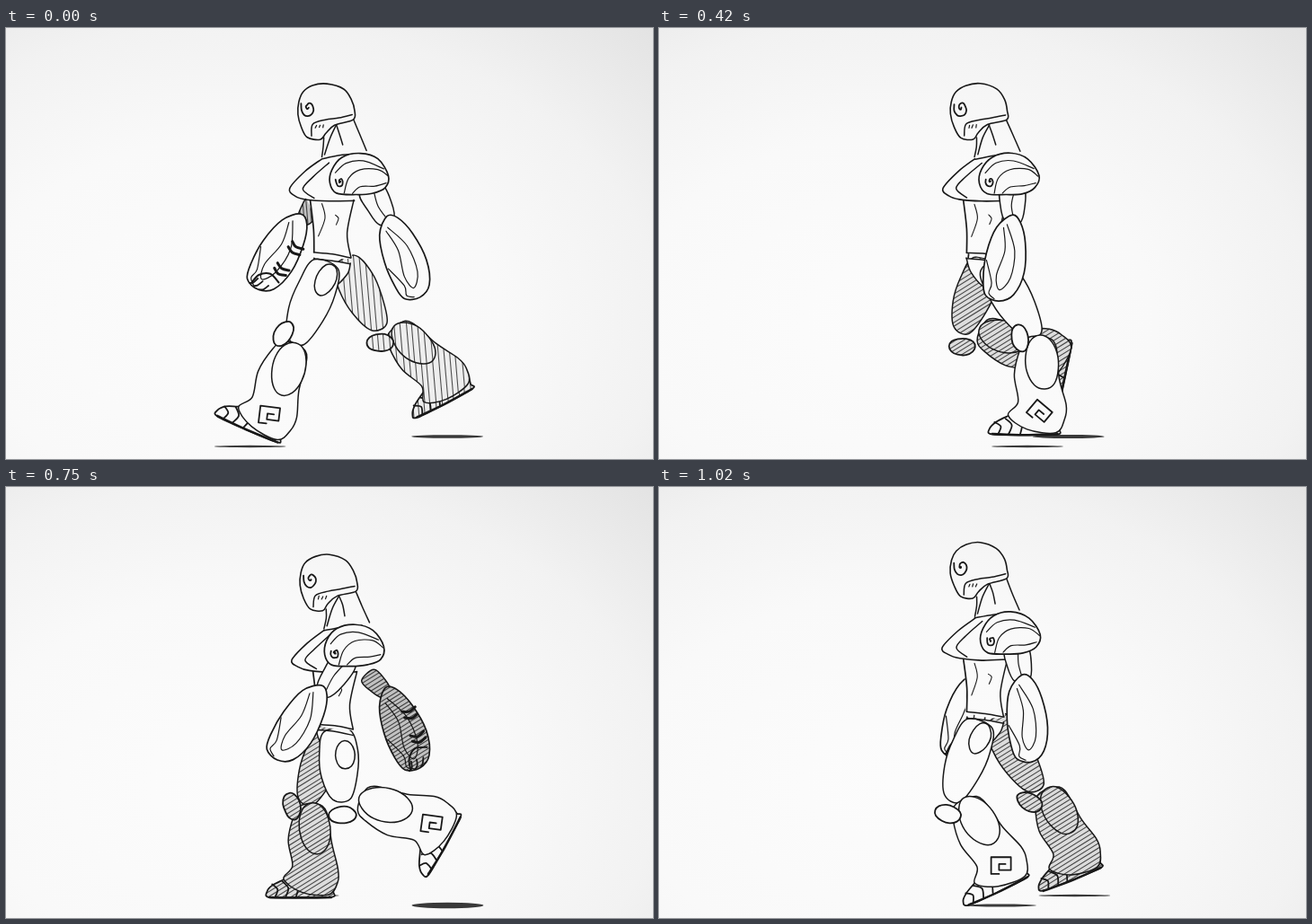
Write an HTML page with a canvas that moves like this. It is 720x480 px and loops after 1.05 s.

```html
<!DOCTYPE html>
<html lang="en">
<head>
<meta charset="utf-8">
<title>Walk cycle</title>
<style>
  html, body { margin: 0; width: 100%; height: 100%; overflow: hidden; }
  body { background: radial-gradient(ellipse at 36% 68%, #fcfcfc 0, #f9f9f9 45%, #f2f2f2 72%, #e3e3e3 100%); }
  canvas { display: block; width: 720px; height: 480px; }
</style>
</head>
<body>
<canvas id="stage" width="720" height="480"></canvas>
<script>
const ctx = document.getElementById('stage').getContext('2d');
const LOOP = 1050, STEP = 30, CYCLE = 37, INK = '#181818';
const TAU = Math.PI * 2, RAD = Math.PI / 180;
const wave = p => Math.cos(TAU * p);

// One stride, shared by both legs: phase, thigh, shin and sole angles in degrees.
const STRIDE = [
  [0, 21, 20, -24],
  [.1, 26, 12, -2],
  [.14, 27, -1, 0],
  [.25, 4, -2, 0],
  [.38, -32, 0, 0],
  [.42, -31, -24, 22],
  [.5, -29, -43, 27],
  [.59, -25, -33, 8],
  [.64, -7, -72, 58],
  [.75, -1, -67, 65],
  [.88, 18, -70, 78],
  [.92, 20, -28, 24],
  [1, 21, 20, -24]
];

function stride(phase) {
  const i = STRIDE.findIndex(row => row[0] > phase);
  const a = STRIDE[i - 1], b = STRIDE[i], s = (phase - a[0]) / (b[0] - a[0]);
  return a.slice(1).map((v, k) => (v + (b[k + 1] - v) * s) * RAD);
}

// Positive angles swing forward, to the left.
const swing = ([x, y], len, angle) => [x - len * Math.sin(angle), y + len * Math.cos(angle)];
const shift = ([x, y], [dx, dy], k = 1) => [x + dx * k, y + dy * k];

let seed = 1;
function rnd() {
  seed = (seed * 16807) % 2147483647;
  return seed / 2147483647;
}

const pairs = a => a.reduce((out, v, i) => (i % 2 ? out[out.length - 1].push(v) : out.push([v]), out), []);

// Curve through points, with a slight hand wobble.
function curve(points, closed) {
  const p = points.map(([x, y]) => [x + rnd() - .5, y + rnd() - .5]);
  const n = p.length;
  const at = i => closed ? p[(i + n) % n] : p[Math.max(0, Math.min(n - 1, i))];
  const path = new Path2D();
  path.moveTo(...p[0]);
  for (let i = 0; i < (closed ? n : n - 1); i++) {
    const [a, b, c, d] = [at(i - 1), at(i), at(i + 1), at(i + 2)];
    path.bezierCurveTo(b[0] + (c[0] - a[0]) / 6, b[1] + (c[1] - a[1]) / 6,
      c[0] - (d[0] - b[0]) / 6, c[1] - (d[1] - b[1]) / 6, c[0], c[1]);
  }
  return path;
}

function stroke(path, width = 1.5) {
  ctx.lineWidth = width;
  ctx.stroke(path);
}

function erase(path) {
  ctx.globalCompositeOperation = 'destination-out';
  ctx.fill(path);
  ctx.globalCompositeOperation = 'source-over';
}

function hatch(path, { angle, gap, tint }) {
  ctx.save();
  ctx.clip(path);
  ctx.globalAlpha = tint;
  ctx.fill(path);
  ctx.globalAlpha = .75;
  ctx.translate(360, 320);
  ctx.rotate(angle * RAD);
  ctx.lineWidth = 1.1;
  ctx.beginPath();
  for (let y = -260; y < 260; y += gap) {
    ctx.moveTo(-260, y);
    ctx.lineTo(260, y + rnd() * 2);
  }
  ctx.stroke();
  ctx.restore();
}

// A limb runs from a to b; shapes are in percent along it and across its width.
const limb = (a, b, w) => ({ a, b, w });
function along({ a, b, w }, list) {
  const dx = b[0] - a[0], dy = b[1] - a[1], len = Math.hypot(dx, dy) || 1;
  return pairs(list).map(([u, v]) =>
    [a[0] + (dx * u - dy / len * w * v) / 100, a[1] + (dy * u + dx / len * w * v) / 100]);
}

const oval = [];
for (let i = 0; i < 10; i++) oval.push(50 - 50 * wave(i / 10), 50 * Math.sin(i * TAU / 10));

const shapes = {
  oval,
  thigh: [0,32, 30,48, 65,47, 98,24, 100,-20, 65,-44, 30,-50, 0,-32],
  shin: [3,20, 15,35, 45,48, 76,40, 92,60, 108,22, 112,-36, 96,-55, 80,-57, 50,-44, 12,-36, 2,-15],
  foot: [-1,75, -2,25, 0,0, 50,-3, 97,0, 101,25, 92,55, 76,80, 60,100, 40,105],
  arm: [0,45, 50,48, 95,30, 100,-25, 55,-46, 0,-40],
  fore: [0,8, 18,38, 50,48, 80,42, 97,28, 101,-8, 90,-40, 62,-52, 28,-40, 6,-18],
  shoulder: [0,12, 4,-20, 22,-48, 52,-57, 82,-42, 100,-4, 94,25, 72,38, 45,40, 12,36]
};

function part(row, shape, ink, width) {
  const path = curve(along(row, shapes[shape]), true);
  erase(path);
  if (ink) hatch(path, ink);
  stroke(path, width);
}

const detail = (row, list, width = 1.2) => stroke(curve(along(row, list)), width);

function spiral(x, y, r, turns) {
  const p = [];
  for (let s = 0; s <= 1; s += 1 / 14) {
    const a = s * turns * TAU + 1;
    p.push([x + r * .75 * s * Math.cos(a), y + r * s * Math.sin(a)]);
  }
  stroke(curve(p), 1.8);
}

// Joints of one leg, from hip to sole.
function poseLeg(phase, hip, size) {
  const [thighTurn, shinTurn, tilt] = stride(phase);
  const lift = Math.max(0, -wave(phase - .2));
  const top = shift(hip, [-8 * wave(phase), 0]);
  const knee = swing(top, 93 * size * (1 - .17 * lift), thighTurn);
  const shinTop = shift(knee, [3 - 16 * Math.sin(shinTurn), 0]);
  const ankle = swing(shinTop, 97 * size, shinTurn);
  const ahead = [-Math.cos(tilt), Math.sin(tilt)], up = [-ahead[1], ahead[0]];
  const heel = shift(shift(ankle, ahead, -22), up, -13);
  const foot = limb(heel, shift(heel, ahead, 75 * size), 24);
  const capTurn = Math.max(-90 * RAD, 2.2 * shinTurn - 10 * RAD);
  const out = [-Math.cos(capTurn), -Math.sin(capTurn)], edge = [-out[1], out[0]];
  const cap = shift(knee, out, 17);
  const shin = limb(shinTop, ankle, 55 * size);
  return {
    lift, shinTurn, shin, foot,
    thigh: limb(top, knee, 44 * size),
    calf: limb(...along(shin, [0, -4, 62, -14]), 37 * size),
    cap: limb(shift(cap, edge, 15), shift(cap, edge, -15), 19)
  };
}

function drawShadow({ foot: { a, b }, lift }, ground) {
  ctx.globalAlpha = .85;
  ctx.beginPath();
  ctx.ellipse((a[0] + b[0]) / 2 + 4, ground, 40, 1.2 + 2 * lift, 0, 0, TAU);
  ctx.fill();
  ctx.globalAlpha = 1;
}

function drawLeg(leg, ink) {
  const { foot } = leg;
  part(leg.thigh, 'thigh', ink);
  part(foot, 'foot', ink, 1.8);
  detail(foot, [0,0, 50,-3, 97,0], 2.4);
  for (const u of [93, 77, 61]) detail(foot, [u, 150 - u, u - 9, 80 - u / 2, u - 5, 0], 1.8);
  part(leg.shin, 'shin', ink);
  part(leg.calf, 'oval', ink);
  part(leg.cap, 'oval', ink, 1.8);
}

function drawEmblem({ shin, shinTurn }) {
  const [[x, y]] = along(shin, [88, -4]);
  ctx.save();
  ctx.translate(x, y);
  ctx.rotate(40 * RAD * Math.max(0, Math.cos(4 * shinTurn)));
  ctx.lineWidth = 1.8;
  ctx.beginPath();
  pairs([-.2,.9, -1,.9, -1,-.8, 1,-.8, 1,.5, -.2,.5, -.2,-.1, .45,-.1]).forEach(([u, v]) => ctx.lineTo(u * 11, v * 11));
  ctx.stroke();
  ctx.restore();
}

// The forearm trails the elbow and lingers near the middle of its swing.
function poseArm(phase, rootX, rootY, rootSwing, elbowX, elbowSwing, width) {
  const reach = wave(phase - .13), c = wave(phase - .09);
  const elbow = [elbowX + elbowSwing * reach, 209];
  const tip = swing(elbow, 96, (8 - 18 * (c + c ** 3)) * RAD);
  return {
    reach,
    upper: limb([rootX + rootSwing * reach, rootY], shift(elbow, [-2, 8]), width),
    fore: limb(elbow, tip, 45)
  };
}

function drawForearm(fore, ink) {
  part(fore, 'fore', ink, 1.7);
  detail(fore, [12,14, 40,-18, 72,-22, 88,-2, 72,12, 42,6, 16,20]);
  detail(fore, [58,45, 82,20, 94,22, 99,5]);
}

function drawFarArm({ upper, fore, reach }, ink) {
  part(upper, 'arm', ink);
  drawForearm(fore, reach > 0 && ink);
  for (const u of [32, 40, 62, 69]) detail(fore, [u, -46, u + 3, -28, u, -12], 3);
  detail(fore, [80,-42, 78,-12, 86,10, 99,14], 2);
  for (const v of [-24, -8, 6]) detail(fore, [90, v, 97, v + 5, 100, v + 12], 1.8);
}

function drawTorso() {
  const [neck, tip, low, under, waistF, hipF, waistB, hipB] =
    pairs([350,146, 314,179, 333,191, 386,192, 341,224, 341,250, 378,229, 382,256]);
  const top = shift(neck, [42, -6]);
  erase(curve([neck, tip, low, waistF, hipF, hipB, waistB, under, top], true));
  stroke(curve([neck, [331, 160], tip, [321, 187], low, [358, 193], under]), 1.6);
  stroke(curve([[358, 150], [340, 166], [329, 179], [341, 189]]));
  stroke(curve([neck, [370, 142], top]));
  stroke(curve([[337, 192], waistF, hipF]), 1.7);
  stroke(curve([under, waistB, hipB]));
  for (const dy of [0, 7]) stroke(curve([hipF, [362, 252], hipB].map(p => shift(p, [0, dy]))));
  stroke(curve([[365, 208], [369, 212], [366, 219]]), 1.1);
  stroke(curve([[350, 196], [353, 212], [346, 232]]), 1.1);
}

function drawPelvis() {
  const path = curve(pairs([341,256, 346,272, 362,288, 378,274, 382,262]));
  erase(path);
  stroke(path);
}

function drawHead() {
  const at = list => pairs(list).map(p => shift(p, [324, 62]));
  const line = (list, w) => stroke(curve(at(list)), w);
  erase(curve(at([28,62, 26,80, 52,77, 76,75, 68,58, 61,42, 40,45]), true));
  line([61,40, 68,57, 76,75]);
  line([28,60, 28,70, 26,82]);
  line([42,46, 35,60, 29,79]);
  line([42,46, 46,56, 49,68]);
  const skull = curve(at([0,20, 5,9, 16,2, 32,0, 50,6, 59,18, 62,30, 61,40, 40,46, 30,55, 24,62, 10,60, 3,48, -1,34]), true);
  erase(skull);
  stroke(skull, 1.6);
  line([60,35, 45,38, 30,40, 16,45, 14,58]);
  for (let x = 20; x < 32; x += 4) line([x, 46, x - 1, 49], 1.2);
  spiral(335, 89, 12, 1.4);
}

function drawShoulder(reach) {
  const x = 388 + 5 * reach;
  const row = limb([x - 33, 167], [x + 33, 166], 48);
  part(row, 'shoulder', null, 1.7);
  detail(row, [10,-12, 28,-34, 58,-38, 92,-20]);
  detail(row, [24,36, 32,2, 52,-18, 82,-18, 99,-2]);
  detail(row, [38,36, 52,22, 76,20, 95,14]);
  spiral(x - 21, 171, 7, 1.4);
}

function draw(f) {
  const phase = f / CYCLE, other = (phase + .5) % 1;
  const drop = 18 * Math.max(0, wave(2 * (phase - .135))) ** 2;
  const sway = [1.5 + .2 * drop, drop];
  const upright = f < 12;
  const ink = { angle: upright ? 85 : 148, gap: upright ? 6.5 : 4.5, tint: upright ? .05 : .13 };

  const nearLeg = poseLeg(phase, [364, 263 + .6 * drop], 1);
  const farLeg = poseLeg(other, [368, 260 + .6 * drop], .95);
  const nearArm = poseArm(phase, 392, 178, 18, 394, 46, 29);
  const farArm = poseArm(other, 366, 195, 34, 368, 56, 21);

  seed = f * 977 + 31;
  ctx.setTransform(1, 0, 0, 1, 0, 0);
  ctx.clearRect(0, 0, 720, 480);
  ctx.strokeStyle = ctx.fillStyle = INK;
  ctx.lineCap = ctx.lineJoin = 'round';
  const upperBody = paint => {
    ctx.save();
    ctx.translate(...sway);
    paint();
    ctx.restore();
  };

  drawShadow(farLeg, 455);
  drawShadow(nearLeg, 466);
  upperBody(() => drawFarArm(farArm, { ...ink, gap: 4, tint: .25 }));
  drawLeg(farLeg, ink);
  upperBody(drawPelvis);
  drawLeg(nearLeg);
  drawEmblem(nearLeg);
  upperBody(() => {
    drawTorso();
    part(limb(...along(nearLeg.thigh, [-2, -12, 38, -8]), 22), 'oval');
    drawHead();
    part(nearArm.upper, 'arm');
    detail(nearArm.upper, [10,-5, 50,5, 95,-4]);
    drawForearm(nearArm.fore);
    drawShoulder(nearArm.reach);
  });
}

const start = performance.now();
let shown = -1;
function tick() {
  const f = Math.floor(((performance.now() - start) % LOOP) / STEP);
  if (f !== shown) draw(shown = f);
  requestAnimationFrame(tick);
}
tick();
</script>
</body>
</html>
```
